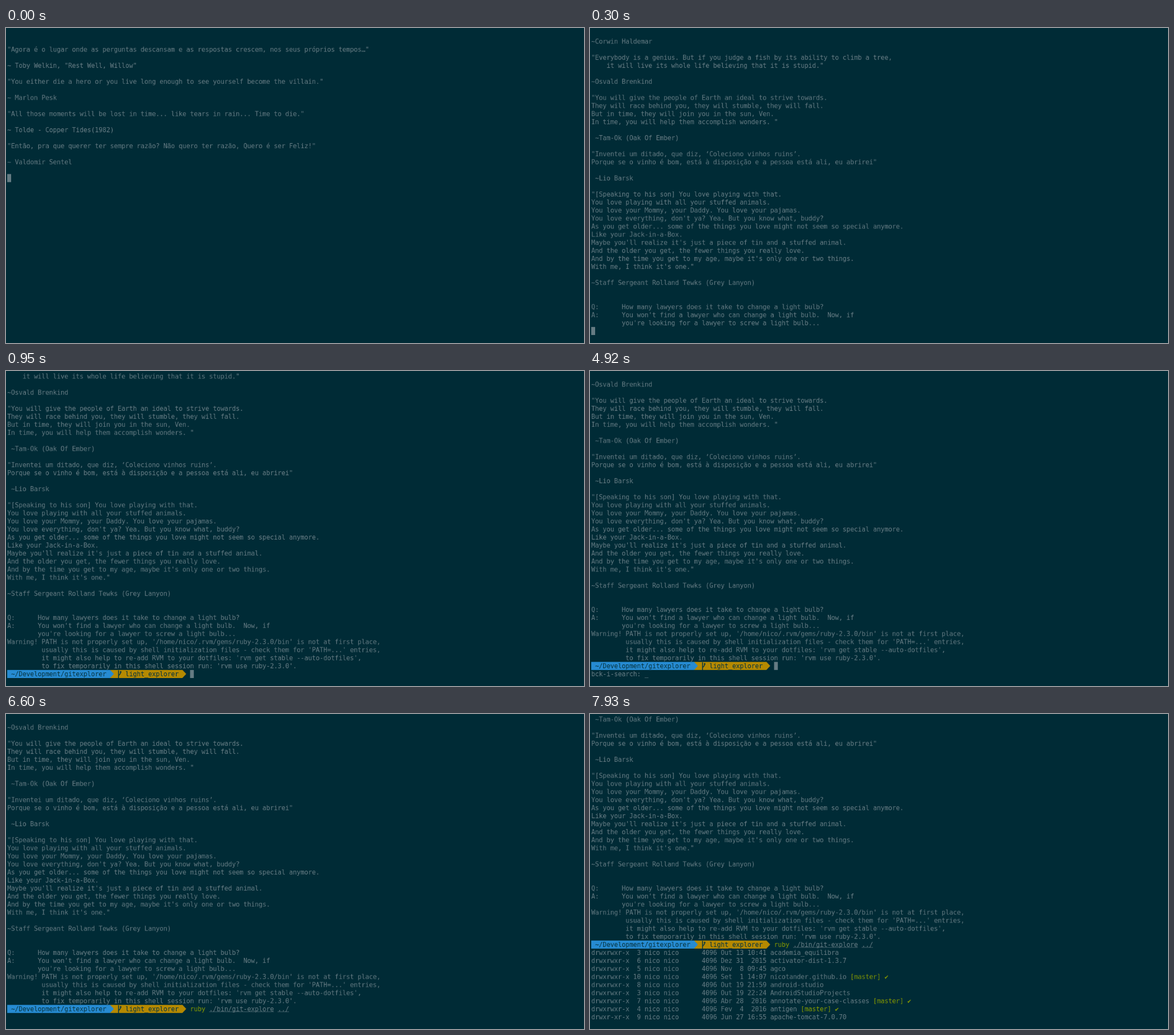
These frames come from a looping animation (1013x553 px, 8000 ms). An HTML page with a canvas:

```html
<!DOCTYPE html>
<html lang="en">
<head>
<meta charset="utf-8">
<title>Terminal session</title>
<style>
  html, body { margin: 0; width: 100%; height: 100%; overflow: hidden; background: #002b36; }
  canvas { display: block; }
</style>
</head>
<body>
<canvas id="stage" width="1013" height="553"></canvas>
<script>
const LOOP = 8000;
const SCREEN = { w: 1366, h: 744 };
const CELL = { w: 9, h: 19, base: 15, underline: 16 };
const ORIGIN = { x: 3, y: 3 };
const ROWS = 38;
const COLOR = {
  back: '#002b36', text: '#657b83', dark: '#073642',
  blue: '#268bd2', yellow: '#b58900', green: '#859900'
};

const banner = `

"Agora é o lugar onde as perguntas descansam e as respostas crescem, nos seus próprios tempos…"

~ Toby Welkin, "Rest Well, Willow"

"You either die a hero or you live long enough to see yourself become the villain."

~ Marlon Pesk

"All those moments will be lost in time... like tears in rain... Time to die."

~ Tolde - Copper Tides(1982)

"Então, pra que querer ter sempre razão? Não quero ter razão, Quero é ser Feliz!"

~ Valdomir Sentel

"Teaching is not about handing over answers but about leaving enough room for every question to grow into something worth pursuing."

~Corwin Haldemar

"Everybody is a genius. But if you judge a fish by its ability to climb a tree,
    it will live its whole life believing that it is stupid."

~Osvald Brenkind

"You will give the people of Earth an ideal to strive towards.
They will race behind you, they will stumble, they will fall.
But in time, they will join you in the sun, Ven.
In time, you will help them accomplish wonders. "

 ~Tam-Ok (Oak Of Ember)

"Inventei um ditado, que diz, ‘Coleciono vinhos ruins’.
Porque se o vinho é bom, está à disposição e a pessoa está ali, eu abrirei"

 ~Lio Barsk

"[Speaking to his son] You love playing with that.
You love playing with all your stuffed animals.
You love your Mommy, your Daddy. You love your pajamas.
You love everything, don't ya? Yea. But you know what, buddy?
As you get older... some of the things you love might not seem so special anymore.
Like your Jack-in-a-Box.
Maybe you'll realize it's just a piece of tin and a stuffed animal.
And the older you get, the fewer things you really love.
And by the time you get to my age, maybe it's only one or two things.
With me, I think it's one."

~Staff Sergeant Rolland Tewks (Grey Lanyon)


Q:      How many lawyers does it take to change a light bulb?
A:      You won't find a lawyer who can change a light bulb.  Now, if
        you're looking for a lawyer to screw a light bulb...
Warning! PATH is not properly set up, '/home/nico/.rvm/gems/ruby-2.3.0/bin' is not at first place,
         usually this is caused by shell initialization files - check them for 'PATH=...' entries,
         it might also help to re-add RVM to your dotfiles: 'rvm get stable --auto-dotfiles',
         to fix temporarily in this shell session run: 'rvm use ruby-2.3.0'.`.split('\n');

const entry = (mode, links, date, name) =>
  `${mode} ${String(links).padStart(2)} nico nico      4096 ${date} ${name}`;

const listing = [
  entry('drwxrwxr-x', 3, 'Out 13 10:41', 'academia_equilibra'),
  entry('drwxrwxr-x', 6, 'Dez 31  2015', 'activator-dist-1.3.7'),
  entry('drwxrwxr-x', 5, 'Nov  8 09:45', 'agco'),
  entry('drwxrwxr-x', 10, 'Set  1 14:07', 'nicotander.github.io [master] ✔'),
  entry('drwxrwxr-x', 8, 'Out 19 21:59', 'android-studio'),
  entry('drwxrwxr-x', 3, 'Out 19 22:24', 'AndroidStudioProjects'),
  entry('drwxrwxr-x', 7, 'Abr 28  2016', 'annotate-your-case-classes [master] ✔'),
  entry('drwxrwxr-x', 4, 'Fev  4  2016', 'antigen [master] ✔'),
  entry('drwxr-xr-x', 9, 'Jun 27 16:55', 'apache-tomcat-7.0.70')
];

const PROMPT = banner.length;
const COMMAND_COL = 48;
const COMMAND = 'ruby ./bin/git-explore ../';
const log = [...banner, '', ...listing];

// last: newest log line; col: cursor column on it; gap: rows below it;
// query: reverse search text; mark: underlined match [start, length]
const scenes = [
  { at: 0, last: 18, col: 0 },
  { at: 100, last: 30, col: 0 },
  { at: 200, last: 44, col: 0 },
  { at: 300, last: PROMPT - 4, col: 0 },
  { at: 410, last: PROMPT, col: 0 },
  { at: 950, last: PROMPT, col: COMMAND_COL },
  { at: 4920, last: PROMPT, col: COMMAND_COL, gap: 1, query: '' },
  { at: 5240, last: PROMPT, gap: 1, query: 'r', command: 'vim lib/explore.rb', mark: [16, 1] },
  { at: 5380, last: PROMPT, gap: 1, query: 'ru', command: COMMAND, mark: [0, 2] },
  { at: 5470, last: PROMPT, gap: 1, query: 'rub', command: COMMAND, mark: [0, 3] },
  { at: 5610, last: PROMPT, gap: 1, query: 'ruby', command: COMMAND, mark: [0, 4] },
  { at: 6600, last: PROMPT, gap: 1, command: COMMAND, styled: true },
  { at: 7830, last: PROMPT + 7, col: 74, command: COMMAND, styled: true },
  { at: 7930, last: PROMPT + 9, command: COMMAND, styled: true }
];

// The terminal is drawn at its own size, then scaled down to the stage.
const stage = document.getElementById('stage');
const stageCtx = stage.getContext('2d');
stageCtx.imageSmoothingQuality = 'high';

const screen2d = document.createElement('canvas');
screen2d.width = SCREEN.w;
screen2d.height = SCREEN.h;
const ctx = screen2d.getContext('2d');
ctx.font = '15.33px "DejaVu Sans Mono", monospace';
ctx.letterSpacing = `${CELL.w - ctx.measureText('0').width}px`;

const cellX = col => ORIGIN.x + col * CELL.w;
const cellY = row => ORIGIN.y + row * CELL.h;

function fillCells(row, col, count, color) {
  ctx.fillStyle = color;
  ctx.fillRect(cellX(col), cellY(row), count * CELL.w, CELL.h);
}

// Each word starts on its own grid column.
function write(row, col, text, color = COLOR.text) {
  ctx.fillStyle = color;
  for (const word of text.matchAll(/\S+/g)) {
    ctx.fillText(word[0], cellX(col + word.index), cellY(row) + CELL.base);
  }
}

function underline(row, col, count) {
  ctx.fillStyle = COLOR.text;
  ctx.fillRect(cellX(col), cellY(row) + CELL.underline, count * CELL.w, 1);
}

function drawArrow(row, col, color) {
  const x = cellX(col), y = cellY(row);
  ctx.fillStyle = color;
  ctx.beginPath();
  ctx.moveTo(x, y);
  ctx.lineTo(x + CELL.w, y + CELL.h / 2);
  ctx.lineTo(x, y + CELL.h);
  ctx.fill();
}

function drawBranch(row, col) {
  ctx.save();
  ctx.translate(cellX(col), cellY(row));
  ctx.strokeStyle = ctx.fillStyle = COLOR.dark;
  ctx.lineWidth = 2;
  ctx.beginPath();
  ctx.moveTo(2, 1);
  ctx.lineTo(2, 19);
  ctx.moveTo(2, 15);
  ctx.bezierCurveTo(2, 10, 7, 12, 7, 5);
  ctx.stroke();
  ctx.beginPath();
  ctx.moveTo(7, 2);
  ctx.lineTo(9.5, 6);
  ctx.lineTo(4.5, 6);
  ctx.fill();
  ctx.restore();
}

function drawPrompt(row, { command = '', mark, styled }) {
  fillCells(row, 0, 27, COLOR.blue);
  fillCells(row, 27, 19, COLOR.yellow);
  drawArrow(row, 27, COLOR.blue);
  drawArrow(row, 46, COLOR.yellow);
  write(row, 1, '~/Development/gitexplorer', COLOR.dark);
  drawBranch(row, 29);
  write(row, 31, 'light_explorer', COLOR.dark);

  if (mark) underline(row, COMMAND_COL + mark[0], mark[1]);
  if (!styled) return write(row, COMMAND_COL, command);
  for (const word of command.matchAll(/\S+/g)) {
    const col = COMMAND_COL + word.index;
    write(row, col, word[0], word.index ? COLOR.text : COLOR.green);
    if (word.index) underline(row, col, word[0].length);
  }
}

function drawLine(row, text) {
  const tag = text.indexOf('[master]');
  if (tag < 0) return write(row, 0, text);
  write(row, 0, text.slice(0, tag));
  write(row, tag, text.slice(tag), COLOR.green);
}

function drawScene(scene) {
  const { last, col, gap = 0, query } = scene;
  const top = Math.max(0, last + gap - ROWS + 1);

  ctx.fillStyle = COLOR.back;
  ctx.fillRect(0, 0, SCREEN.w, SCREEN.h);

  for (let i = top; i <= last; i++) {
    const end = i === last ? col : undefined;
    if (i !== PROMPT) drawLine(i - top, log[i].slice(0, end));
    else if (end !== 0) drawPrompt(i - top, scene);
  }
  if (col !== undefined) fillCells(last - top, col, 1, COLOR.text);
  if (query !== undefined) write(ROWS - 1, 0, `bck-i-search: ${query}_`);

  stageCtx.drawImage(screen2d, 0, 0, stage.width, stage.height);
}

let current;
function tick() {
  const time = performance.now() % LOOP;
  const scene = scenes.findLast(s => s.at <= time);
  if (scene !== current) drawScene(current = scene);
  requestAnimationFrame(tick);
}
tick();
</script>
</body>
</html>
```
